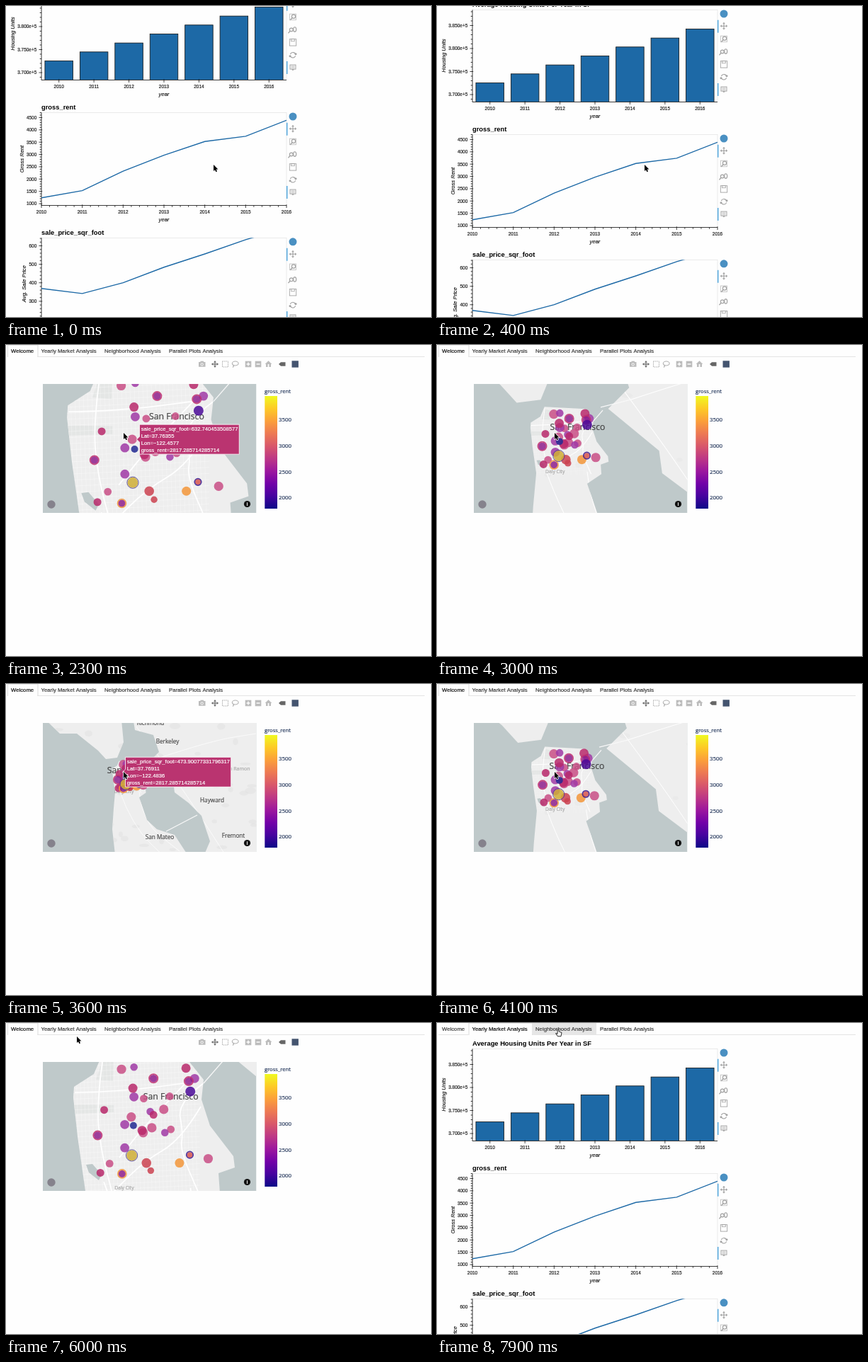
These frames come from a looping animation (600x439 px, 8000 ms). An HTML page with a canvas:

```html
<!DOCTYPE html>
<html lang="en">
<head>
<meta charset="utf-8">
<title>Housing dashboard</title>
<style>
html, body { margin: 0; width: 100%; height: 100%; overflow: hidden; background: #fefefe; }
canvas { display: block; width: 600px; height: 439px; }
</style>
</head>
<body>
<canvas id="stage"></canvas>
<script>
const W = 600, H = 439, LOOP = 8000, STEP = 100;
const canvas = document.getElementById('stage');
const ctx = canvas.getContext('2d');
const dpr = window.devicePixelRatio || 1;
canvas.width = W * dpr;
canvas.height = H * dpr;

const SANS = '"Liberation Sans", Arial, sans-serif';
const OPEN = '"Open Sans", sans-serif';
const BLUE = '#1d69a6', INK = '#111', GREY = '#a3a3a3';

// ---------- helpers ----------
function text(str, x, y, size, { color = '#222', align = 'left', style = '', family = SANS, rot = 0 } = {}) {
  ctx.save();
  ctx.translate(x, y);
  ctx.rotate(rot);
  ctx.font = `${style} ${size}px ${family}`;
  ctx.textAlign = align;
  ctx.fillStyle = ctx.strokeStyle = color;
  ctx.lineWidth = 0.2;
  ctx.lineJoin = 'round';
  ctx.fillText(str, 0, size * 0.36);
  if (style !== 'bold') ctx.strokeText(str, 0, size * 0.36); // slightly heavier small type
  ctx.restore();
}

function stroke(color, width = 1) {
  ctx.strokeStyle = color;
  ctx.lineWidth = width;
  ctx.stroke();
}

function fill(color) {
  ctx.fillStyle = color;
  ctx.fill();
}

function trace(pts, close) {
  ctx.beginPath();
  for (let i = 0; i < pts.length; i += 2) ctx.lineTo(pts[i], pts[i + 1]);
  if (close) ctx.closePath();
}

function line(pts, color, width) {
  trace(pts);
  stroke(color, width);
}

function shape(pts, color) {
  trace(pts, true);
  fill(color);
}

// Open curve through the midpoints of its key points
function curve(pts, color, width) {
  const n = pts.length;
  ctx.beginPath();
  ctx.moveTo(pts[0], pts[1]);
  for (let i = 2; i < n - 2; i += 2)
    ctx.quadraticCurveTo(pts[i], pts[i + 1], (pts[i] + pts[i + 2]) / 2, (pts[i + 1] + pts[i + 3]) / 2);
  ctx.lineTo(pts[n - 2], pts[n - 1]);
  stroke(color, width);
}

function rect(x, y, w, h, color) {
  ctx.fillStyle = color;
  ctx.fillRect(x, y, w, h);
}

function box(x, y, w, h, color, width = 1) {
  ctx.strokeStyle = color;
  ctx.lineWidth = width;
  ctx.strokeRect(x, y, w, h);
}

function arc(x, y, rx, ry = rx, from = 0, to = Math.PI * 2) {
  ctx.beginPath();
  ctx.ellipse(x, y, rx, ry, 0, from, to);
}

function disc(x, y, r, color) {
  arc(x, y, r);
  fill(color);
}

function random(seed) {
  return () => (seed = (seed * 16807) % 2147483647) / 2147483647;
}

const smooth = k => k * k * (3 - 2 * k);

// Value at time t of keyframes [[time, a, b...], ...]
function track(keys, t, ease = smooth) {
  const i = keys.findIndex(k => k[0] >= t);
  if (i < 0) return keys[keys.length - 1].slice(1);
  if (i === 0) return keys[0].slice(1);
  const p = keys[i - 1], q = keys[i], k = ease((t - p[0]) / (q[0] - p[0]));
  return p.slice(1).map((v, j) => v + (q[j + 1] - v) * k);
}

// ---------- timeline ----------
const SCROLL = [[100, 62], [700, 0]];
const POINTER = [[500, 293, 224], [1100, 27, 6], [1800, 27, 7], [2150, 166, 124],
  [5500, 166, 124], [6000, 100, 19], [6300, 95, 7], [7300, 95, 7], [7800, 171, 9]];
const ZOOM = [[2000, 1], [2300, 0.86], [2800, 0.5], [3500, 0.175], [3750, 0.175], [4600, 1], [4900, 1], [5500, 0.765]]
  .map(([t, z]) => [t, Math.log(z)]);
const OPEN_MAP = 1700, CLOSE_MAP = 6500;

// ---------- tabs ----------
const TABS = [['Welcome', 2, 44.5], ['Yearly Market Analysis', 44.5, 134], ['Neighborhood Analysis', 134, 225],
  ['Parallel Plots Analysis', 225, 313]];

function drawTabs(active, hover) {
  line([2, 16.5, 591, 16.5], '#e4e4e4');
  TABS.forEach(([name, a, b], i) => {
    if (i === active) {
      rect(a, 0, b - a, 17, '#fefefe');
      line([a + 0.5, 17, a + 0.5, 0, b + 0.5, 0, b + 0.5, 17], '#dcdcdc');
    } else if (i === hover) rect(a, 0, b - a, 16, '#e6e6e6');
    text(name, a + 5, 8, 7.75, { color: i === active ? '#111' : '#3c3c3c' });
  });
}

// ---------- charts ----------
const L = 50, R = 396;

function moveIcon(x, y, color, r) {
  for (let i = 0; i < 4; i++) {
    ctx.save();
    ctx.translate(x, y);
    ctx.rotate(i * Math.PI / 2);
    line([0, 0, r, 0], color, 1.1);
    shape([r, 0, r - 2, -2, r - 2, 2], color);
    ctx.restore();
  }
}

function magnifier(x, y, r) {
  arc(x, y, r);
  stroke(GREY, 1.2);
  line([x - r * 0.7, y + r * 0.7, x - r * 1.8, y + r * 2], GREY, 1.4);
}

function plotTools(top) {
  const x = 405, at = i => top + 5.5 + i * 17.85;
  disc(x, at(0), 5.5, '#4a90c2');
  for (const i of [1, 6]) line([396.7, at(i) - 9, 396.7, at(i) + 9], '#4aa3dc', 1.4);
  moveIcon(x, at(1) - 0.5, GREY, 5);
  box(x - 4.5, at(2) - 4.5, 9, 8.5, '#c4c4c4', 0.9);
  magnifier(x + 1, at(2) - 1, 2.6);
  magnifier(x - 2.2, at(3), 2.4);
  arc(x + 2.7, at(3) - 0.5, 2, 3.3);
  stroke(GREY, 1.2);
  box(x - 4.7, at(4) - 4.7, 9.4, 9.4, GREY, 0.9);
  box(x - 2.5, at(4) - 4.7, 5, 3, GREY, 0.8);
  for (const side of [0, Math.PI]) {
    arc(x, at(5), 3.8, 3.8, side + 0.3, side + 2.7);
    stroke(GREY, 1.1);
    disc(x + 4 * Math.cos(side), at(5) - 1.5 * Math.cos(side), 1.5, GREY);
  }
  box(x - 4, at(6) - 4, 8, 6, GREY);
  shape([x - 2, at(6) + 2, x + 2, at(6) + 2, x, at(6) + 4.5], GREY);
  for (const d of [-2, 0]) line([x - 2.5, at(6) + d, x + 2.5, at(6) + d], GREY, 0.8);
}

function frame({ title, top, bottom, label, labelX, labelY, first, y0, dv, dy, fmt = String }) {
  text(title, L, top - 8, 9.36, { style: 'bold', color: '#000' });
  box(L, top, R - L, bottom - top, '#e5e5e5', 0.8);
  line([L, top, L, bottom, R, bottom], INK, 0.8);
  for (let i = -4; i < 60; i++) {
    const y = y0 - i * dy / 5, major = i % 5 === 0;
    if (y < top || y > bottom) continue;
    line([L - (major ? 3.5 : 2.3), y, L + (major ? 1.2 : 0), y], INK, 0.8);
    if (major) text(fmt(first + dv * i / 5), 43.2, y, 6.43, { align: 'right' });
  }
  text(label, labelX, labelY, 7.6, { style: 'italic', align: 'center', rot: -Math.PI / 2 });
  plotTools(top);
}

function years(bottom, x0, dx, minor) {
  for (let i = 0; i < 7; i++) {
    const x = x0 + i * dx;
    line([x, bottom - 1.2, x, bottom + 3.5], INK, 0.8);
    text(2010 + i, x, bottom + 9.3, 6.43, { align: 'center' });
    for (let j = 1; minor && i < 6 && j < 5; j++) line([x + dx * j / 5, bottom, x + dx * j / 5, bottom + 2.3], INK, 0.8);
  }
  text('year', 223, bottom + 20, 7.6, { style: 'italic', align: 'center' });
}

function series(values, top, toY) {
  ctx.save();
  ctx.beginPath();
  ctx.rect(L, top, R - L, H);
  ctx.clip();
  line(values.flatMap((v, i) => [L + i * (R - L) / 6, toY(v)]), BLUE, 1.4);
  ctx.restore();
}

function drawCharts(scroll, hover) {
  ctx.save();
  ctx.translate(0, -scroll);
  drawTabs(1, hover);

  const slot = (R - L) / 7;
  for (let i = 0; i < 7; i++) {
    const x = L + slot * (i + 0.1), y = 139.5 - i * 12.67;
    rect(x, y, slot * 0.8, 166.5 - y, BLUE);
    box(x, y, slot * 0.8, 166.5 - y, INK, 0.8);
  }
  frame({ title: 'Average Housing Units Per Year in SF', top: 36.5, bottom: 166.5, label: 'Housing Units',
    labelX: 9, labelY: 101, first: 3.7, y0: 156, dv: 0.05, dy: 32.5, fmt: v => v.toFixed(3) + 'e+5' });
  years(166.5, L + slot / 2, slot, false);

  frame({ title: 'gross_rent', top: 212.5, bottom: 343.5, label: 'Gross Rent',
    labelX: 22, labelY: 278, first: 1000, y0: 341, dv: 500, dy: 17.36 });
  years(343.5, L, (R - L) / 6, true);
  series([1239, 1530, 2324, 2971, 3528, 3739, 4390], 212.5, v => 341 - (v - 1000) * 0.03472);

  frame({ title: 'sale_price_sqr_foot', top: 389.3, bottom: 520, label: 'Avg. Sale Price',
    labelX: 25.5, labelY: 454, first: 300, y0: 478.8, dv: 100, dy: 26.1 });
  series([369, 342, 400, 484, 556, 633, 698], 389.3, v => 478.8 - (v - 300) * 0.261);
  ctx.restore();
}

// ---------- map ----------
const AX = 166.5, AY = 128; // zoom anchor
const MAP = [52, 55, 301.5, 182];
const WATER = '#bfc9ca';

// Points read at a given zoom, as offsets from the anchor
const world = (zoom, ...pts) => pts.map((v, i) => (v - (i % 2 ? AY : AX)) / zoom);
const city = (...pts) => world(0.765, ...pts);
const bay = (...pts) => world(0.175, ...pts);

const LAND = [
  [ // peninsula
    ...bay(155, 250, 150, 205, 152, 175),
    ...city(112, 237, 101, 160, 95, 105, 96, 90, 124, 72, 136, 44, 255, 50, 279, 80, 276, 108, 288, 145,
      301, 162, 321, 188, 323, 204, 300, 212, 302, 240),
    ...bay(188, 160, 199, 192, 213, 205, 238, 213, 262, 250)
  ],
  bay(50, 45, 76, 70, 100, 70, 130, 94, 141, 106, 157, 104, 166, 82, 162, 40),
  bay(178, 40, 182, 65, 208, 72, 216, 96, 202, 110, 236, 138, 238, 153, 258, 168, 276, 186, 288, 222, 276, 250, 400, 260, 400, 30)
];
const PARKS = [city(95, 115, 152, 116, 152, 126, 96, 128), city(127, 80, 137, 50, 152, 54, 151, 82)];
const LAKE = city(113, 200, 122, 199, 135, 214, 131, 222, 117, 211);
const ROADS = [
  city(279, 85, 242, 112, 250, 155, 246, 180, 272, 240),
  city(275, 118, 247, 165, 195, 195, 150, 240),
  city(137, 48, 128, 112, 133, 175, 150, 240),
  city(264, 74, 200, 140, 160, 190),
  city(97, 98, 160, 97, 260, 84),
  bay(160, 150, 178, 200, 230, 250),
  bay(188, 152, 193, 195, 245, 236),
  bay(184, 60, 217, 104, 254, 155, 312, 245),
  bay(217, 104, 290, 80, 353, 70)
];
const BRIDGES = [city(279, 85, 306, 54), bay(197, 109, 217, 104), bay(226, 208, 270, 185)];
const LABELS = [['Richmond', 204, 56], ['Berkeley', 228, 82], ['Hayward', 291, 165], ['San Mateo', 217, 217],
  ['Fremont', 321, 215]];

// [fill, radius, ring colour, x, y, x, y...] at zoom 1
const MARKERS = [
  ['#c94f86', 6.6, '', 162, 46, 180, 134, 202, 163, 218, 154, 240, 120, 322, 211],
  ['#c94f86', 5.4, '', 203, 100, 251, 96, 253, 157, 140, 220],
  ['#a03aa6', 6.4, '', 297, 63, 185, 97, 168, 148, 168, 191],
  ['#a03aa6', 5.3, '', 185, 42, 215, 124, 242, 163],
  ['#b92a6c', 6.5, '', 183, 81, 200, 159, 281, 44],
  ['#b92a6c', 5.5, '', 130, 121, 221, 130, 123, 237],
  ['#cc4250', 6.8, '', 208, 219],
  ['#cc4250', 4.7, '', 216, 233],
  ['#8f1f8c', 5.4, '#c0306f', 221, 63, 286, 68, 118, 168],
  ['#4a0a98', 7, '', 289, 87],
  ['#232b93', 5, '', 184, 150],
  ['#f4973a', 6.5, '', 269, 219],
  ['#8f1f8c', 5.2, '#f4973a', 163, 239],
  ['#cfae35', 7.4, '#4a3a90', 181, 205],
  ['#d9564f', 4, '#3a1a90', 288, 204]
];

function drawTip(x, y, price, lat, lon) {
  const lines = ['sale_price_sqr_foot=' + price, 'Lat=' + lat, 'Lon=\u2212' + lon, 'gross_rent=2817.285714285714'];
  ctx.font = `7.64px ${SANS}`;
  const w = ctx.measureText(lines[0]).width + 4, top = y - 21;
  trace([x, top, x + w, top, x + w, top + 42, x, top + 42, x, y + 4, x - 4, y, x, y - 4], true);
  fill('#ba3470');
  stroke('#fff', 0.8);
  lines.forEach((s, i) => text(s, x + 2.2, top + 6.2 + i * 10, 7.64, { color: '#fff' }));
}

function drawMap(s, t) {
  const sx = u => AX + u * s, sy = v => AY + v * s;
  const scr = pts => pts.map((v, i) => i % 2 ? sy(v) : sx(v));
  const near = Math.max(0, Math.min(1, (s - 0.25) / 0.4));
  const place = (name, [u, v], size, color) =>
    text(name, sx(u), sy(v) - 1, size, { align: 'center', family: OPEN, color });

  ctx.save();
  ctx.beginPath();
  ctx.rect(...MAP);
  ctx.clip();
  rect(...MAP, WATER);

  ctx.save();
  const land = new Path2D();
  for (const p of LAND) {
    const q = scr(p);
    land.moveTo(q[0], q[1]);
    for (let i = 2; i < q.length; i += 2) land.lineTo(q[i], q[i + 1]);
    land.closePath();
  }
  ctx.fillStyle = '#eeeeee';
  ctx.fill(land);
  ctx.clip(land);
  for (const p of PARKS) shape(scr(p), '#e4e6e5');

  // soft hills far out, street grid close up
  const rnd = random(11);
  ctx.globalAlpha = (1 - near) * 0.5;
  for (let i = 0; i < 60 && near < 1; i++) {
    const [u, v] = bay(60 + rnd() * 290, 55 + rnd() * 180);
    arc(sx(u), sy(v), 3 + rnd() * 5, 2 + rnd() * 3);
    fill('#e2e2e2');
  }
  ctx.globalAlpha = near * 0.5;
  for (let u = -110; u < 130 && near; u += 7) line([sx(u), sy(-110), sx(u + 8), sy(150)], '#fff', 0.5);
  for (let v = -110; v < 150 && near; v += 10) line([sx(-110), sy(v + 4), sx(140), sy(v - 8)], '#fff', 0.6);
  ctx.globalAlpha = 1;
  for (const p of ROADS) curve(scr(p), '#fff', 0.7 + near);
  shape(scr(LAKE), WATER);
  ctx.restore();
  for (const p of BRIDGES) line(scr(p), '#f8f8f8', 1.3);

  if (s > 0.9) {
    place('Golden Gate Park', [-34, -6], 6.4, '#a9a9a9');
    place('Silver Terrace', [115, 88], 6.4, '#a9a9a9');
  }
  place('Daly City', [0.5, 138], 6.8, '#a9a9a9');
  if (s < 0.4) {
    for (const [name, x, y] of LABELS) place(name, bay(x, y), 8.2, '#4d4d4d');
    place('San Ramon', bay(326, 120), 7, '#a9a9a9');
  }
  place('San Francisco', [86.5, -31], 12.3, '#444');

  ctx.globalAlpha = 0.85;
  for (const [color, r, edge, ...at] of MARKERS)
    for (let i = 0; i < at.length; i += 2) {
      const [x, y] = [sx(at[i] - AX), sy(at[i + 1] - AY)];
      disc(x, y, r, color);
      if (edge) {
        arc(x, y, r + 0.7);
        stroke(edge, r > 7 ? 1 : 1.8);
      }
    }
  ctx.globalAlpha = 1;

  disc(64, 225, 5.7, '#85828c');
  disc(340.5, 224.5, 4.6, INK);
  text('i', 340.5, 224.5, 7, { style: 'bold', align: 'center', color: '#fff' });
  ctx.restore();

  if (t >= 2200 && t < 3000) drawTip(sx(13.5) + 10.4, sy(6), '632.740453508577', '37.76355', '122.4577');
  else if (t >= 3200 && t < 3700) drawTip(168.5, 124.3, '473.90077331796317', '37.76911', '122.4836');
}

function modebar() {
  const y = 27, pale = '#bcbcbc', dark = '#666';
  rect(272, y - 3, 9.5, 6.8, pale);
  rect(274.5, y - 4.3, 4.5, 2, pale);
  arc(276.7, y + 0.4, 1.7);
  stroke('#fff', 0.9);
  moveIcon(295, y, dark, 4.6);
  ctx.setLineDash([1.4, 1]);
  box(305.5, y - 4, 8, 8, '#aaa');
  ctx.setLineDash([]);
  arc(323.7, y - 1, 4.4, 3);
  stroke('#b0b0b0', 1.1);
  line([320.5, y + 1, 321.5, y + 3, 320, y + 4.5], '#b0b0b0', 1.1);
  for (const x of [342, 356]) {
    rect(x - 4.3, y - 4.3, 8.6, 8.6, pale);
    line([x - 2.5, y, x + 2.5, y], '#fff', 1.4);
  }
  line([342, y - 2.5, 342, y + 2.5], '#fff', 1.4);
  shape([370.5, y - 4.7, 375.3, y, 365.7, y], pale);
  rect(367, y, 2.6, 4, pale);
  rect(371.4, y, 2.6, 4, pale);
  shape([385, y, 388, y - 2.8, 394.5, y - 2.8, 394.5, y + 2.8, 388, y + 2.8], dark);
  rect(403.5, y - 4.7, 9.4, 9.4, '#44546f');
}

function colorbar() {
  const stops = ['#0d0887', '#46039f', '#7201a8', '#9c179e', '#bd3786', '#d8576b', '#ed7953', '#fb9f3a', '#fdca26', '#f0f921'];
  const g = ctx.createLinearGradient(0, 231, 0, 72);
  stops.forEach((c, i) => g.addColorStop(i / 9, c));
  rect(365.3, 72, 17.7, 159, g);
  const font = { family: OPEN, color: '#22355a' };
  text('gross_rent', 365, 65, 7.6, font);
  for (let i = 0; i < 4; i++) text(3500 - i * 500, 385, 105.3 + i * 36.7, 7.9, font);
}

// ---------- pointer ----------
function arrow(x, y) {
  trace([x, y, x, y + 9, x + 2, y + 7.2, x + 3.4, y + 10.3, x + 5, y + 9.6, x + 3.7, y + 6.6, x + 6.4, y + 6.6], true);
  stroke('#fff', 1.4);
  fill('#000');
}

function hand(x, y) {
  trace([x - 0.8, y, x + 0.8, y, x + 1.2, y + 3.2, x + 5, y + 4.5, x + 4, y + 9.8, x - 0.6, y + 9.8, x - 3.4, y + 5.6, x - 0.9, y + 6.3], true);
  fill('#fff');
  stroke(INK, 0.9);
}

// ---------- main ----------
function draw(t) {
  ctx.setTransform(dpr, 0, 0, dpr, 0, 0);
  rect(0, 0, W, H, '#fefefe');
  const [px, py] = track(POINTER, t);
  const hover = t > 1100 && py < 16 ? TABS.findIndex(([, a, b]) => px >= a && px < b) : -1;
  if (t >= OPEN_MAP && t < CLOSE_MAP) {
    drawTabs(0, hover);
    colorbar();
    if (t >= 1900) modebar();
    drawMap(Math.exp(track(ZOOM, t, k => k)[0]), t);
  } else {
    drawCharts(track(SCROLL, t)[0], hover);
  }
  (hover >= 0 ? hand : arrow)(px, py);
}

const start = performance.now();
function tick() {
  const t = (performance.now() - start) % LOOP;
  draw(Math.floor(t / STEP) * STEP);
  requestAnimationFrame(tick);
}
tick();
</script>
</body>
</html>
```
